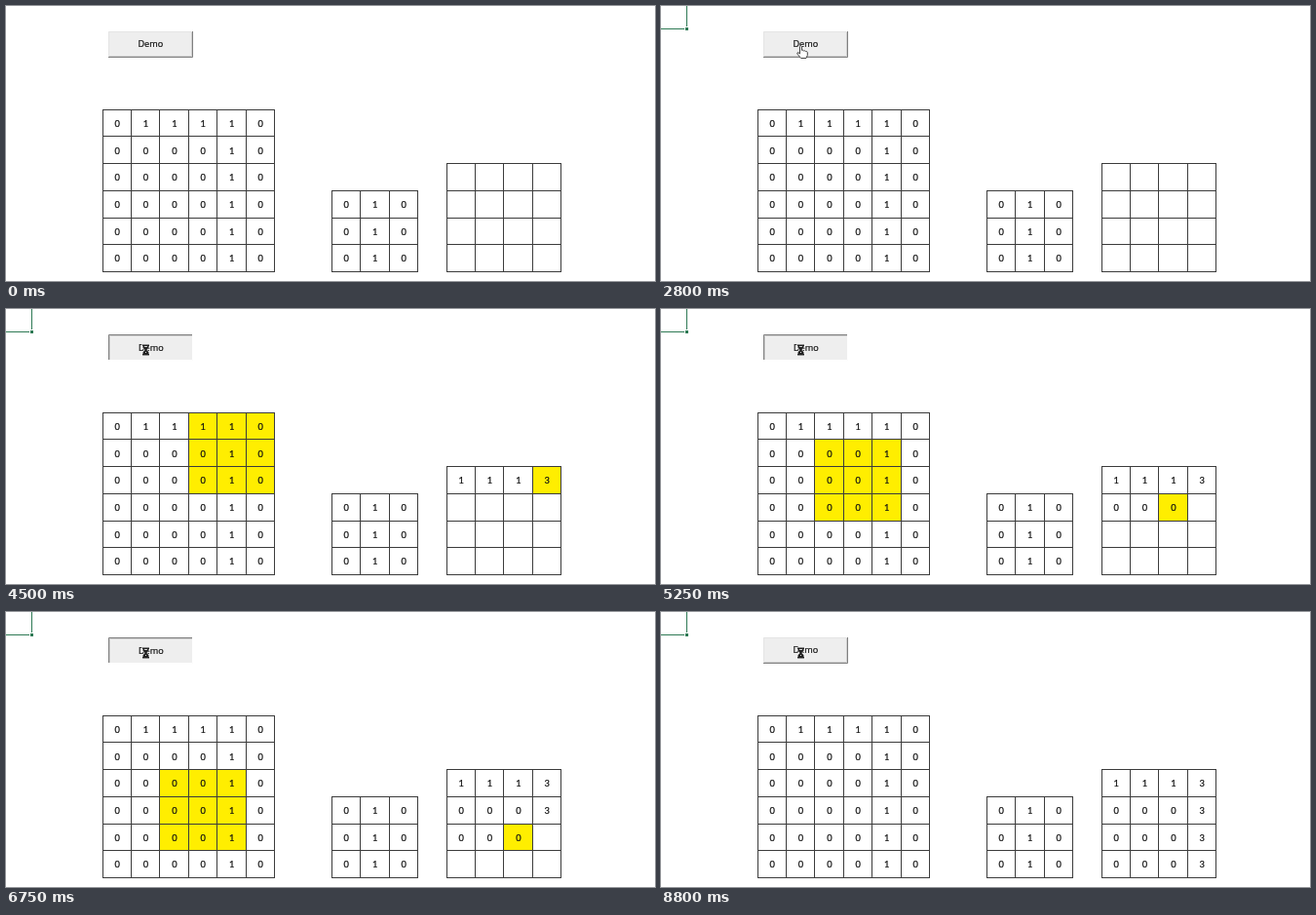
An HTML page for the animation above (9 s loop, 666 by 282 pixels).

```html
<!DOCTYPE html>
<html lang="en">
<head>
<meta charset="utf-8">
<title>Convolution demo</title>
<style>
  html, body { margin: 0; width: 100%; height: 100%; overflow: hidden; background: #fff; }
  svg { display: block; width: 100vw; height: 100vh; }
  text { text-anchor: middle; fill: #111; stroke: #111; stroke-width: .22px; }
  .digit { font: 9.3px Lato, sans-serif; }
  .label { font: 9.1px "Open Sans", "Noto Sans", sans-serif; }
</style>
</head>
<body>
<svg id="stage" viewBox="0 0 666 282" xmlns="http://www.w3.org/2000/svg">
  <g id="selection" fill="#2f7a55">
    <rect x="26" y="0" width="1" height="21"/>
    <rect x="0" y="23" width="24" height="1"/>
    <rect x="25" y="22" width="3" height="3"/>
  </g>
  <g id="button">
    <rect x="105" y="26" width="87" height="27" fill="#eeeeee"/>
    <g id="raised" fill="none">
      <path d="M105.5 52V26.5H191" stroke="#e4e4e4"/>
      <path d="M105 52.5H191.5V26" stroke="#808080"/>
      <path d="M106 51.5H190.5V27" stroke="#cccccc"/>
    </g>
    <g id="pressed" fill="none">
      <path d="M105.5 52V26.5H191" stroke="#808080"/>
      <path d="M106.5 52V27.5H191" stroke="#cccccc"/>
      <path d="M105 52.5H191.5V26" stroke="#fff"/>
    </g>
    <text id="label" class="label" x="148.3" y="42.2">Demo</text>
  </g>
  <g id="grids"></g>
  <path id="hand" fill="#fff" stroke="#444" stroke-width="1" stroke-linejoin="round"
    d="M142.5 49V41.6Q143.5 40 144.5 41.6V45.4Q146 44.8 146.6 46Q148 45.4 148.6 46.6Q150 46.2 150.3 47.6V50.5L149 53.5H143.6L140 49.2Q139.4 47.6 140.8 47.6Z"/>
  <g id="hourglass">
    <path d="M139.5 36H147.5V39L145 42L147.5 45V48H139.5V45L142 42L139.5 39Z" fill="#fff"/>
    <path d="M140 36.5H147V38H146.5V39.8L144.4 42L146.5 44.2V46H147V47.5H140V46H140.5V44.2L142.6 42L140.5 39.8V38H140Z" fill="#222"/>
    <path d="M142 38.5H145M143.5 44V45" stroke="#fff" stroke-width=".8"/>
  </g>
</svg>
<script>
const LOOP = 9000, FIRST = 3200, STEP = 332, TICK = 50;
const SELECT_AT = 2150, HOVER_AT = 2300, PRESS_AT = 2900;
const CELL_W = 29.4, CELL_H = 27.68, TOP = 106.3;
const YELLOW = "#ffee00";
const $ = id => document.getElementById(id);

const input = Array.from({ length: 6 }, (_, r) =>
  Array.from({ length: 6 }, (_, c) => +(c === 4 || (r === 0 && c > 0 && c < 4))));
const kernel = Array.from({ length: 3 }, () => [0, 1, 0]);
const output = Array.from({ length: 4 }, (_, r) => Array.from({ length: 4 }, (_, c) =>
  kernel.reduce((sum, row, i) =>
    sum + row.reduce((s, k, j) => s + k * input[r + i][c + j], 0), 0)));

function make(tag, attrs, parent) {
  const el = document.createElementNS("http://www.w3.org/2000/svg", tag);
  for (const key in attrs) el.setAttribute(key, attrs[key]);
  return parent.appendChild(el);
}

// Returns rows of { fill, digit } elements.
function makeGrid(values, left, top) {
  const group = make("g", {}, $("grids"));
  const x = c => Math.floor(left + c * CELL_W);
  const y = r => Math.floor(top + r * CELL_H);
  const rows = values.length, cols = values[0].length;
  const cells = values.map((row, r) => row.map((value, c) => {
    const fill = make("rect", {
      x: x(c), y: y(r), width: x(c + 1) - x(c), height: y(r + 1) - y(r), fill: "none"
    }, group);
    const digit = make("text", {
      class: "digit", x: left + (c + 0.5) * CELL_W + 0.4, y: top + (r + 0.5) * CELL_H + 3.9
    }, group);
    digit.textContent = value;
    return { fill, digit };
  }));
  let d = "";
  for (let r = 0; r <= rows; r++) d += `M${x(0)} ${y(r) + 0.5}H${x(cols) + 1}`;
  for (let c = 0; c <= cols; c++) d += `M${x(c) + 0.5} ${y(0)}V${y(rows) + 1}`;
  make("path", { d, stroke: "#3c3c3c", fill: "none" }, group);
  return cells;
}

const inputCells = makeGrid(input, 99, TOP);
makeGrid(kernel, 334.2, TOP + 3 * CELL_H);
const outputCells = makeGrid(output, 452, TOP + 2 * CELL_H);

const stepStart = i => Math.ceil((FIRST + i * STEP) / TICK) * TICK;
const END = stepStart(16);
const show = (el, on) => el.setAttribute("visibility", on ? "visible" : "hidden");
const paint = (cell, on) => cell.fill.setAttribute("fill", on ? YELLOW : "none");

function render(t) {
  let step = -1;
  while (step < 16 && t >= stepStart(step + 1)) step++;
  const active = step >= 0 && step < 16;
  const row = Math.floor(step / 4), col = step % 4;
  // The result cell lights up one tick before its window and value.
  const solved = active && t >= stepStart(step) + TICK;

  inputCells.forEach((line, r) => line.forEach((cell, c) =>
    paint(cell, solved && r >= row && r < row + 3 && c >= col && c < col + 3)));
  outputCells.forEach((line, r) => line.forEach((cell, c) => {
    const i = r * 4 + c;
    paint(cell, active && i === step);
    show(cell.digit, i < step || (i === step && solved));
  }));

  const down = t >= PRESS_AT && t < END;
  show($("raised"), !down);
  show($("pressed"), down);
  $("label").setAttribute("transform", down ? "translate(.5 .8)" : "");
  show($("selection"), t >= SELECT_AT);
  show($("hand"), t >= HOVER_AT && t < FIRST);
  show($("hourglass"), t >= FIRST);
}

const origin = performance.now();
function frame() {
  render((performance.now() - origin) % LOOP);
  requestAnimationFrame(frame);
}
frame();
</script>
</body>
</html>
```
